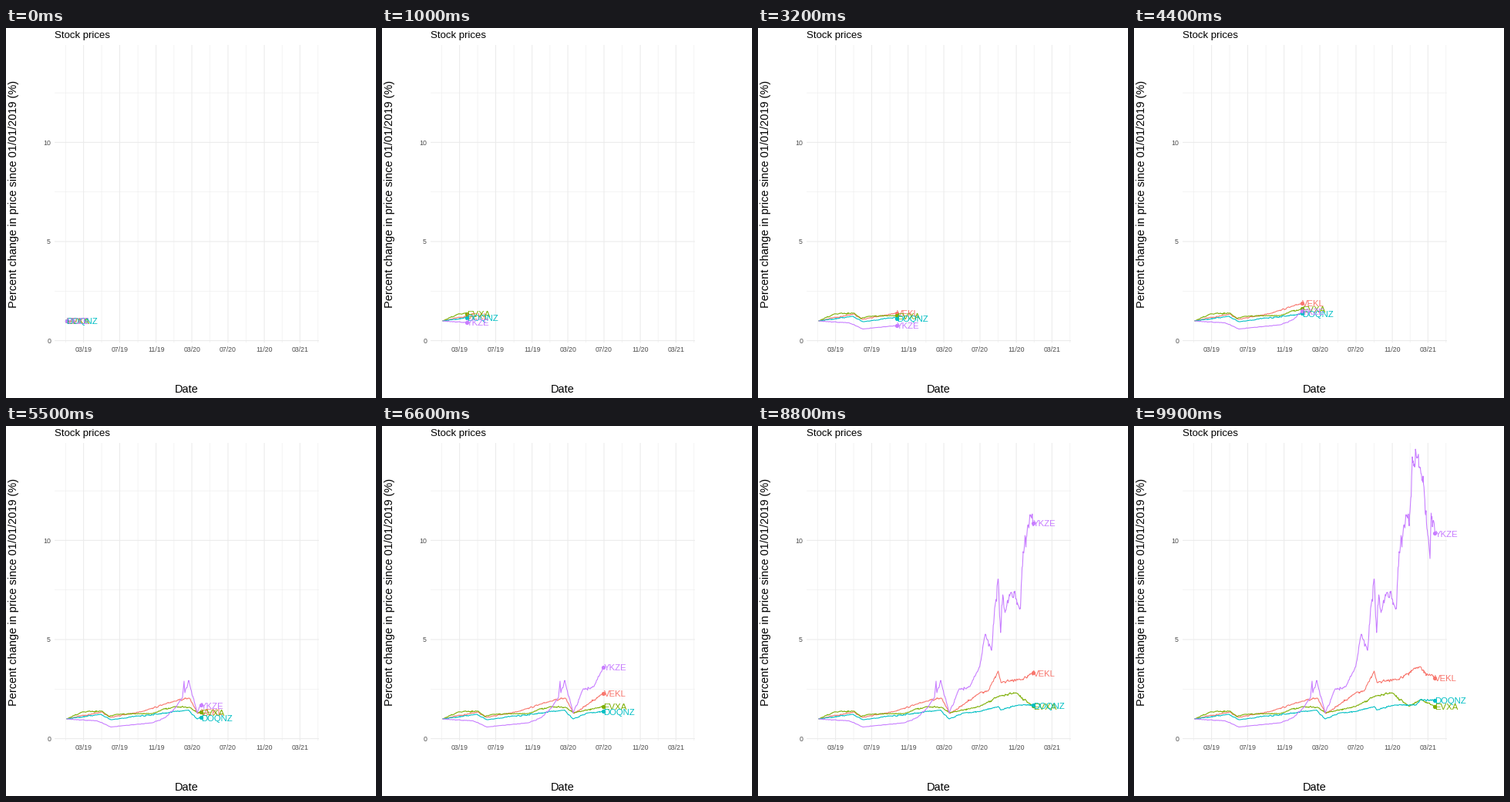
These frames come from a looping animation (480x480 px, 10000 ms). A matplotlib script:

```python
import matplotlib.pyplot as plt
import numpy as np
from matplotlib.animation import FuncAnimation

SIZE, DPI = 480, 72
FRAMES, INTERVAL = 100, 100
LEFT, RIGHT, TOP, BOTTOM = 63, 406, 22, 408.3   # panel edges
X_START, X_END, X_STEP = 78.6, 390.4, 3.165
Y_START, Y_ZERO, Y_UNIT = 380, 405.6, 25.72
TRADING_DAY = 0.55

plt.rcParams["font.family"] = "Liberation Sans"

# Main turning points of each series in stage pixels (x, y).
PRICES = {
    "VEKL": ("#F8766D", [
        (124, 371), (136, 378), (178, 370), (218, 357), (238, 353),
        (249, 373), (287.5, 346.5), (299, 343), (311.6, 318),
        (315.5, 333), (342, 329), (368, 313), (390.4, 327)]),
    "EVXA": ("#7CAE00", [
        (99, 371), (125, 370), (133, 377), (143, 374), (190, 373),
        (218, 364), (238, 365), (248, 372), (287.5, 364), (311, 351),
        (335, 346.5), (357, 363.5), (372, 355), (390.4, 364)]),
    "DOQNZ": ("#00BFC4", [
        (123, 374), (136, 381), (237, 368.5), (248, 380), (268, 372),
        (287.5, 370.5), (312, 364), (315, 368.5), (338, 362), (366, 362),
        (371, 355), (390.4, 355.8)]),
    "YKZE": ("#C77CFF", [
        (118, 382.5), (136, 390.5), (190, 385), (207, 378), (221, 364),
        (229, 352), (231, 331), (232, 346), (237, 330), (248, 372),
        (261, 341), (275, 338), (287.5, 312.5), (295, 270), (303, 291),
        (307, 236), (311.5, 198.5), (314.7, 268), (317.5, 219),
        (320.5, 242), (328, 216), (340.5, 236), (344, 163), (353.5, 117),
        (357, 129.5), (361, 40), (368.5, 39), (375, 65), (384, 172),
        (385.5, 113), (390.4, 139.5)]),
}


def daily_path(points, rng):
    """Join the turning points with market jitter that fades out at each."""
    xs, ys = np.array([(X_START, Y_START), *points]).T
    x = np.union1d(np.arange(X_START, X_END, TRADING_DAY), xs)
    seg = np.clip(np.searchsorted(xs, x, "right") - 1, 0, len(xs) - 2)
    part = (x - xs[seg]) / (xs[seg + 1] - xs[seg])
    y = np.interp(x, xs, ys)
    level = Y_ZERO - y
    swing = np.minimum(0.012 * level * (1 + level / 220), 8)
    noise = rng.normal(0, 1, len(x))
    for i in range(1, len(x)):
        noise[i] = 0.6 * noise[i - 1] + 0.8 * noise[i]
    return x, y + swing * np.sqrt(np.sin(np.pi * part).clip(0)) * noise


fig = plt.figure(figsize=(SIZE / DPI, SIZE / DPI), dpi=DPI, facecolor="white")
ax = fig.add_axes([0, 0, 1, 1])
ax.set(xlim=(0, SIZE), ylim=(SIZE, 0))
ax.axis("off")


def grid(xs, ys, width):
    style = dict(color="#EBEBEB", lw=width, snap=False, zorder=1,
                 solid_capstyle="butt")
    for x in xs:
        ax.plot([x, x], [TOP, BOTTOM], **style)
    for y in ys:
        ax.plot([LEFT, RIGHT], [y, y], **style)


def write(x, y, text, size, color="black", **kw):
    return ax.text(x, y, text, size=size, color=color, va="baseline", **kw)


months = ["03/19", "07/19", "11/19", "03/20", "07/20", "11/20", "03/21"]
month_x = np.array([100.6, 147.5, 194.7, 241.1, 288, 335.1, 381.3])
minor_x = np.r_[77.3, (month_x[1:] + month_x[:-1]) / 2, 404.8]
grid(minor_x, [Y_ZERO - v * Y_UNIT for v in (2.5, 7.5, 12.5)], 0.53)
grid(month_x, [Y_ZERO - v * Y_UNIT for v in (0, 5, 10)], 1.07)

for x, name in zip(month_x, months):
    write(x, 420, name, 8.8, "#4D4D4D", ha="center")
for v in (0, 5, 10):
    write(58, Y_ZERO - v * Y_UNIT + 3.3, str(v), 8.8, "#4D4D4D", ha="right")
mid = (LEFT + RIGHT) / 2
write(LEFT, 13, "Stock prices", 13.2)
write(mid, 473, "Date", 14.5, ha="center")
write(14, 215, "Percent change in price since 01/01/2019 (%)", 14.5,
      ha="center", rotation=90, rotation_mode="anchor")

rng = np.random.default_rng(19)
series = []
for name, (color, points) in PRICES.items():
    x, y = daily_path(points, rng)
    line, = ax.plot([], [], color=color, lw=1.07, zorder=3,
                    solid_capstyle="butt", solid_joinstyle="round")
    dot, = ax.plot([], [], "o", color=color, ms=5.2, mew=0, zorder=4)
    label = write(0, 0, name, 11.38, color, zorder=5)
    series.append((x, y, line, dot, label))


def draw(k):
    head = min(X_START + X_STEP * k, X_END)
    for x, y, line, dot, label in series:
        tip = np.interp(head, x, y)
        past = x < head
        line.set_data(np.append(x[past], head), np.append(y[past], tip))
        dot.set_data([head], [tip])
        label.set_position((head, tip + 4.4))
    return [artist for s in series for artist in s[2:]]


anim = FuncAnimation(fig, draw, frames=FRAMES, interval=INTERVAL,
                     repeat=True, repeat_delay=0, blit=False)
plt.show()
```
